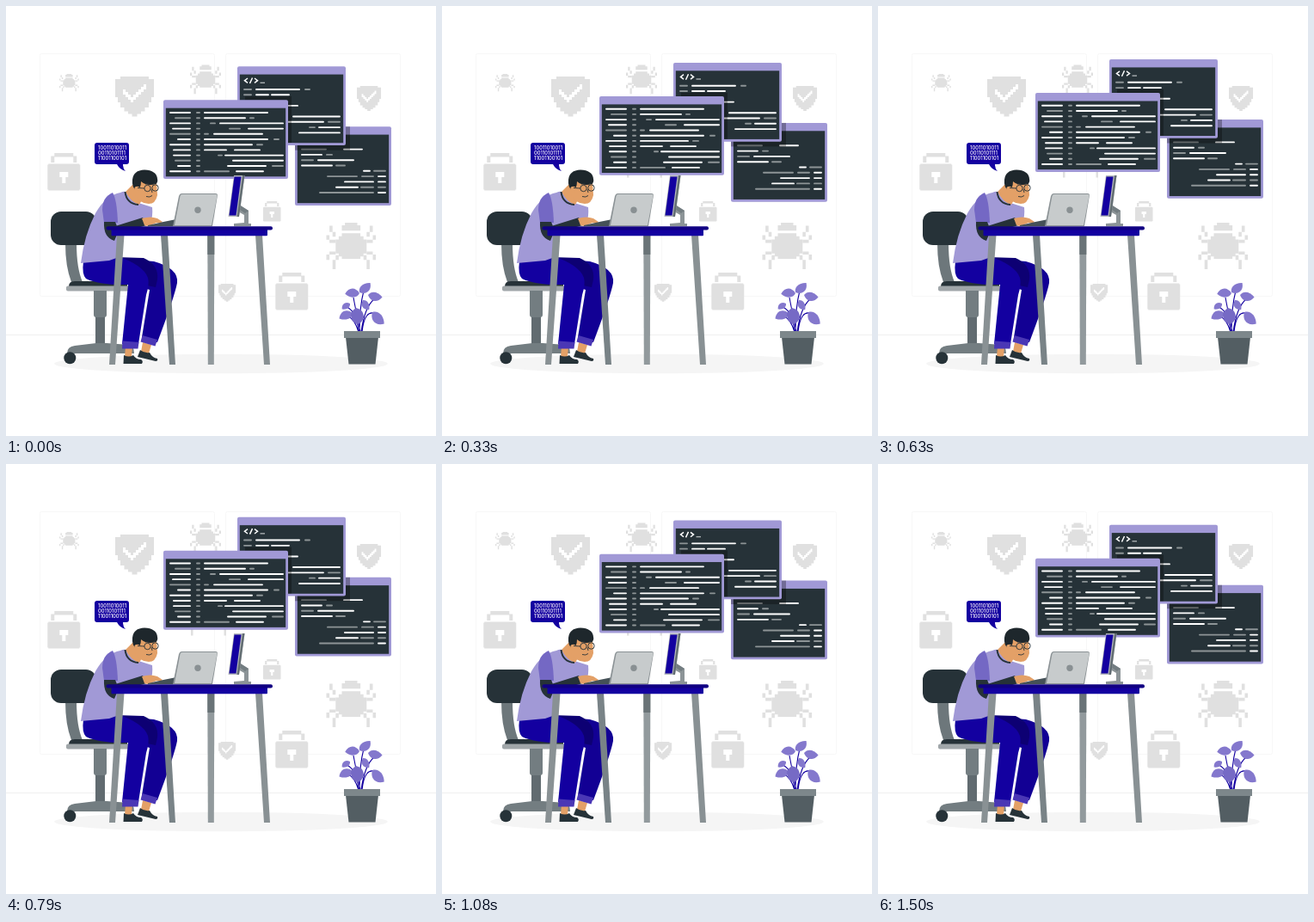
An HTML page that plays this animation: 500x500 px, repeating every 1540 ms.

```html
<!DOCTYPE html>
<html lang="en">
<head>
<meta charset="utf-8">
<title>Programmer at work</title>
<style>
  html, body { margin: 0; width: 100%; height: 100%; overflow: hidden; background: #fff; }
  svg { display: block; width: 100%; height: 100%; }
  .code { fill: none; stroke-width: 1.9; stroke-linecap: round; }
  .bits { font: 500 5.8px Inter, sans-serif; fill: #fff; }
</style>
</head>
<body>
<svg viewBox="0 0 500 500">
  <defs>
    <path id="legs" d="M1 1h1v2h-1zM2 3h1v1.5h-1zM0 4h1v1.5h-1zM1 5.5h2v1h-2zM1 9.3h2v1h-2zM0 10.3h1v1.7h-1zM3 10.5h1v1.5h-1zM2 12h1v3h-1z"/>
    <g id="bug">
      <path d="M6 0h4v.8h1v1.8h-6v-1.8h1zM5 3.4h6v1h1v1h1v4.5h-1v1h-1v.8h-6v-.8h-1v-1h-1v-4.5h1v-1h1z"/>
      <use href="#legs"/><use href="#legs" transform="translate(16) scale(-1 1)"/>
    </g>
    <g id="shield">
      <path d="M2 0h11v1h2v7h-1v2h-1v2h-1.5v1.5h-1.5v1h-1.5v1h-2v-1h-1.5v-1h-1.5v-1.5h-1.5v-2h-1v-2h-1v-7h2z"/>
      <path fill="#fff" d="M3 5h1v1h1v1h1v1h1v-1h1v-1h1v-1h1v-1h1v-1h1v2h-1v1h-1v1h-1v1h-1v1h-1v1h-1v-1h-1v-1h-1v-1h-1z"/>
    </g>
    <g id="lock">
      <path d="M1 12.5h36v1h1v29h-1v1h-36v-1h-1v-29h1zM4 11V3.5h4V0h22v3.5h4V11h-4V4.5h-22V11z"/>
      <path fill="#fff" d="M14 22h10v6h-3v7h-4v-7h-3z"/>
    </g>
    <path id="leaf" d="M0 0C1 -6 8 -9 16 -5C14 4 6 6 0 0z"/>
  </defs>

  <!-- backdrop -->
  <g fill="none" stroke="#f7f7f7">
    <rect x="39.5" y="55.5" width="203" height="282" rx="2"/>
    <rect x="255.5" y="55.5" width="203" height="282" rx="2"/>
    <path stroke="#efefef" d="M0 382.5H500"/>
  </g>
  <ellipse cx="250" cy="416" rx="194" ry="11.3" fill="#f5f5f5"/>
  <g fill="#e0e0e0">
    <use href="#bug" transform="translate(372.5 252) scale(3.6)"/>
    <use href="#bug" transform="translate(214 68.5) scale(2.25)"/>
    <use href="#bug" transform="translate(62 79) scale(1.42 1.35)"/>
    <path d="M215 190h2.5v9.5h-2.5zM253.500 190h2.500v9.500h-2.500z"/>
    <use href="#shield" transform="translate(127 82) scale(3)"/>
    <use href="#shield" transform="translate(408 93) scale(1.87)"/>
    <use href="#shield" transform="translate(247 323) scale(1.34)"/>
    <use href="#lock" transform="translate(48.300 171)"/>
    <use href="#lock" transform="translate(313.300 310)"/>
    <use href="#lock" transform="translate(299 227) scale(.54)"/>
  </g>

  <g id="screens"></g>

  <!-- chair -->
  <path fill="#6d777b" d="M69 276H82Q82 305 89 321H76Q69 303 69 276z"/>
  <rect x="52" y="239" width="53" height="39" rx="12" fill="#263238"/>
  <path fill="#263238" d="M73 326Q73 320 80 320H141V326z"/>
  <rect x="70" y="325.500" width="76" height="6" rx="2" fill="#a0a6a9"/>
  <path fill="#616b70" d="M104 360h11v36h-11z"/>
  <path fill="#737d81" d="M102 331h15v28q0 3 -3 3h-9q-3 0 -3 -3zM71 404Q71 396 80 395L105 392H117L143 394Q149 396 149 404z"/>
  <circle cx="74.300" cy="409.300" r="7" fill="#263238"/>

  <!-- legs and shoes -->
  <path fill="#e3a067" d="M139 396h8l-1 12h-8zM159 391l10 3 -3 10 -9 -2z"/>
  <path fill="#263238" d="M137 406Q143 409 148 406Q151 411 157 411Q160 413 158 416H136.500zM156 400Q161 404 167 403Q170 409 176 410Q177 413 174 413L153 408z"/>
  <path fill="#120094" d="M112 292L172 297Q201 305 199 322Q196 338 176 391L158 385L167 330L130 318z"/>
  <path fill="#0d0073" d="M128 292L160 293Q178 301 176 318L174 327L130 318z"/>
  <path fill="#1300a0" d="M90 297L127 290Q160 301 165 316Q167 323 163 336L154 393H135L142 324Q109 325 93 317Q88 312 90 297z"/>
  <path fill="#4a37b5" d="M135.500 389.500L154.500 391 153.500 398.500H135zM158.500 383L176 388 173.500 395.500L156.500 390.500z"/>

  <!-- torso and head -->
  <path fill="#a199d6" d="M133 217Q143 212 151 228L170 234Q171 244 168 252L135 266L134 291L120 296L87 299Q91 266 104 241Q116 220 133 217z"/>
  <path fill="#7468c4" d="M124 217Q112 222 112 237L114 252L130 252Q129 225 124 217z"/>
  <path fill="#e3a067" d="M139 216L149 206L160 222L155 231Q145 228 139 216z"/>
  <path fill="none" stroke="#263238" stroke-width="2" d="M138.500 216Q140 230 154 231"/>
  <path fill="#e3a067" d="M150 206Q151 198 160 200L175 203L176 220Q174 230 166 230Q155 230 150 219z"/>
  <path fill="#1e272c" d="M147 202Q148 191 161 190.500Q175 191 176 201Q177 205 174 207Q164 210 157 204Q157 212 152 215Q146 211 147 202z"/>
  <circle cx="152.500" cy="213" r="3.200" fill="#e3a067"/>
  <g fill="none" stroke="#263238" stroke-width=".9">
    <circle cx="164.500" cy="212" r="3.700"/><circle cx="173.500" cy="211.500" r="3.700"/>
    <path d="M153 211.500l8 .5M162 207l4 -1M171 206.500l4 0M163 221.500q4 1.500 7 -1M169 213l1 4"/>
  </g>
  <path fill="#263238" d="M114 251H127L131 261L126 273Q113 269 114 251zM127 256L159 246L164 255L140 261z"/>
  <path fill="#e3a067" d="M158 247Q168 244 176 247L182 251Q181 253 175 252L165 256L161 255z"/>

  <!-- laptop and monitor -->
  <path fill="#455157" d="M165 255L183 251L198 248V256H165z"/>
  <path fill="#8b9295" d="M204 218H244Q246 218 246 220L240 256H194L201 221Q202 218 204 218z"/>
  <path fill="#c7cbcc" d="M205 219H244Q246 219 245.500 221L239 255H196L202.500 221Q203 219 205 219z"/>
  <circle cx="223" cy="237.300" r="3.700" fill="#899093"/>
  <path fill="#8c9497" d="M271 231L282 238V253H285V256H265V253L277 252V243L270 239z"/>
  <path fill="#737d81" d="M271 231L282 238L278 241L271 236z"/>
  <path fill="#b5b9bb" d="M265 197H277.500L271 245H258.500z"/>
  <path fill="#1300a0" d="M265.500 198.500H273.500L267.500 243.500H259.500z"/>
  <path fill="#626d72" d="M275 197H277.500L271 245H268.500z"/>

  <!-- desk -->
  <path fill="#899194" d="M129 266h8.500L127 417h-7zM290 266h8l9 151h-7z"/>
  <path fill="#798387" d="M180 266h8l9 151h-7z"/>
  <path fill="#929a9d" d="M234.300 266h8l-.5 151h-7z"/>
  <path fill="#697377" d="M234.300 266h8v23h-8z"/>
  <rect x="122.500" y="259" width="181.500" height="8.300" rx="1" fill="#1300a0"/>
  <rect x="116.500" y="256.300" width="193.500" height="4.300" rx="2" fill="#110083"/>

  <!-- speech bubble -->
  <path fill="#1300a0" d="M106 159H140Q143 159 143 162V181Q143 184 140 184H136Q136 189 139 192Q132 190 129 184H106Q103 184 103 181V162Q103 159 106 159z"/>
  <g class="bits">
    <text x="107" y="167.200">10011010011</text>
    <text x="107" y="173.200">00110101111</text>
    <text x="107" y="179.200">11001100101</text>
  </g>

  <!-- plant -->
  <g fill="none" stroke="#1300a0" stroke-width="1.100">
    <path d="M411 379Q411 350 416 331M412 379Q406 350 404 339M413 379Q417 350 428 341M410 379Q408 355 396 350M414 379Q417 352 430 358M410 379Q405 363 397 361"/>
  </g>
  <g fill="#8478cd">
    <use href="#leaf" transform="translate(411 333) rotate(-24)"/>
    <use href="#leaf" transform="translate(411 334) rotate(195)"/>
    <use href="#leaf" transform="translate(421 336) rotate(26)"/>
    <use href="#leaf" transform="translate(400 346) rotate(162) scale(.68)"/>
    <use href="#leaf" transform="translate(403 357) rotate(175)"/>
    <use href="#leaf" transform="translate(426 356) rotate(62) scale(1.150)"/>
    <use href="#leaf" transform="translate(415 342) rotate(75) scale(.8)"/>
    <path fill="#766ac5" d="M407 351Q416 353 416 362Q414 369 408 370Q401 367 401 359Q402 354 407 351z"/>
  </g>
  <path fill="#535e63" d="M395 385H433L429.500 416.500H398.500z"/>
  <path fill="#7d878b" d="M393 378h42v8h-42z"/>
</svg>

<script>
const LOOP = 1540, RISE = 10, LEAD = 50;
const screens = document.getElementById('screens');

// Rows are "from-to" spans; a leading g marks a grey one.
const codePaths = (top, step, rows) => {
  const d = { white: '', grey: '' };
  rows.forEach((row, i) => row.split(' ').filter(Boolean).forEach(span => {
    const [from, to] = span.replace('g', '').split('-').map(Number);
    d[span[0] === 'g' ? 'grey' : 'white'] += `M${from + 1} ${top + i * step}H${to - 1}`;
  }));
  return `<path class="code" stroke="#fff" d="${d.white}"/><path class="code" stroke="#8d9496" d="${d.grey}"/>`;
};

const screen = (x, y, w, h, content) =>
  `<rect x="${x}" y="${y}" width="${w}" height="${h}" rx="2" fill="#a199d6"/>
   <rect x="${x + 2.8}" y="${y + 9.4}" width="${w - 5.6}" height="${h - 12.2}" fill="#263238"/>${content}`;

const shade = (x, y, w, h) => `<rect x="${x}" y="${y}" width="${w}" height="${h}" opacity=".3"/>`;

const rightCode = codePaths(166.6, 6.3, [
  'g343-373 392-415', '343-368 g372-380', 'g343-358 362-405', '343-380 g383-395',
  '415-424 g427-442', 'g373-409 g413-428 432-442', '393-428 432-442',
  '383-410 g412-428 g432-442', 'g364-428 432-442']);

const backCode = codePaths(97, 6.3, [
  'g276-286 290-342 g347-354', 'g276-286 290-306 308-330', '', '290-340', '',
  '333-389', '320-370 g374-389', 'g352-360 363-389', '340-389']);

const prompt = `<path fill="none" stroke="#fff" stroke-width="1.5" d="M281 84l-3.500 2.700 3.500 2.700M286.500 83.500l-3 6.500M289 84l3.500 2.700 -3.500 2.700"/>
  <path stroke="#a9afb1" stroke-width="1.400" d="M295.500 89.300h5.500"/>`;

const frontRows = [
  '190-215 230-305', 'g196-215 230-279 g283-289', '190-215 g237-244 248-323',
  '193-215 g259-273 281-323', 'g190-215 g230-236 241-299', '199-215 230-305 g311-318',
  '190-215 230-287 g291-299', '194-215 230-257 265-296', '194-215 g246-252 254-323',
  'g196-215 263-323', '199-215 257-303 g309-323', '190-215 g230-260 267-300'];
const frontCode = codePaths(124, 6.2, frontRows.map(row => row + ' g221-226'));

screens.innerHTML =
  screen(336, 140.2, 112, 91.8, rightCode + shade(336, 140.2, 64, 27.5)) +
  screen(269, 70.2, 126, 91.8, prompt + backCode + shade(278, 105, 54, 54)) +
  screen(183, 109.3, 145, 91.8, frontCode);

function draw(now) {
  const phase = (now + LEAD) % LOOP / LOOP;
  const y = RISE * (Math.abs(2 * phase - 1) - 1 + 2 * LEAD / LOOP);
  screens.setAttribute('transform', `translate(0 ${y.toFixed(3)})`);
  requestAnimationFrame(draw);
}
draw(performance.now());
</script>
</body>
</html>
```
